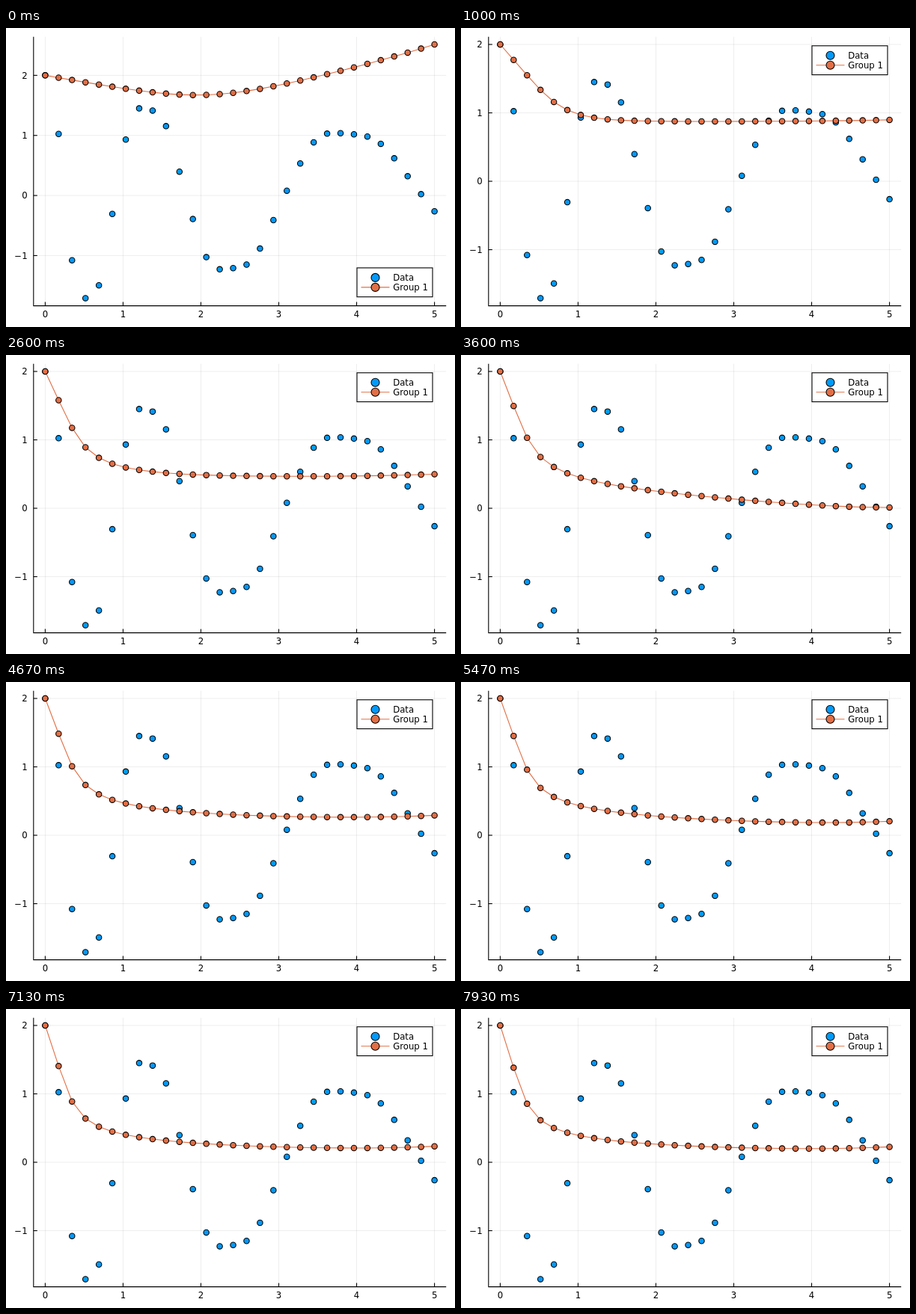
Recreate the animation shown at these times as an HTML page with a canvas. Size 600 px wide and 400 px high, loop 8 s.

```html
<!DOCTYPE html>
<html lang="en">
<head>
<meta charset="utf-8">
<title>Curve fit</title>
<style>
  html, body { margin: 0; width: 100%; height: 100%; overflow: hidden; background: #fff; }
  canvas { display: block; width: 600px; height: 400px; }
</style>
</head>
<body>
<canvas id="plot" width="600" height="400"></canvas>
<script>
const ctx = document.getElementById('plot').getContext('2d');
const LOOP = 8000, FPS = 15;
const COUNT = 30, SPAN = 5, SUBSTEPS = 8;
const BLUE = '#009afa', ORANGE = '#e26f46';
const AXIS = { left: 36.8, right: 588.2, top: 11.8, bottom: 371.6 };

// Runge-Kutta solution of u' = rate(u, t); returns the first component at COUNT times.
function solve(rate, start) {
  const h = SPAN / (COUNT - 1) / SUBSTEPS;
  const add = (u, k, f) => u.map((value, i) => value + k[i] * f);
  const values = [start[0]];
  let u = start;
  for (let n = 0; n < (COUNT - 1) * SUBSTEPS; n++) {
    const t = n * h;
    const k1 = rate(u, t);
    const k2 = rate(add(u, k1, h / 2), t + h / 2);
    const k3 = rate(add(u, k2, h / 2), t + h / 2);
    const k4 = rate(add(u, k3, h), t + h);
    u = u.map((value, i) => value + h / 6 * (k1[i] + 2 * k2[i] + 2 * k3[i] + k4[i]));
    if ((n + 1) % SUBSTEPS === 0) values.push(u[0]);
  }
  return values;
}

// The data: a cubic spiral that winds inwards.
const data = solve(([x, y]) => [
  -.1 * x ** 3 + 2 * y ** 3,
  -2 * x ** 3 - .1 * y ** 3
], [2, 0]);

// Lift of the fitted curve against its decay: [seconds, lift].
const lifts = [
  [0, 2.24], [1, 1.065], [2.6, .215], [3.6, -.1],
  [4.67, .025], [5.6, -.03], [6.4, .003], [8, 0]
];

function liftAt(s) {
  const i = lifts.findIndex(([time]) => time > s);
  const [t0, a] = lifts[i - 1], [t1, b] = lifts[i];
  return a + (b - a) * (s - t0) / (t1 - t0);
}

// The fit: a saturating cubic decay whose strength grows as training goes on.
function fitAt(s) {
  const pull = 2.2 + .175 * s;
  const gain = 1.4 + .32 * s;
  const swing = .27 * Math.max(0, 1 - s);
  const lift = liftAt(s);
  return solve(([u], t) => [
    lift - pull * Math.tanh(gain * u ** 3 / pull)
      + swing * Math.tanh((t - 2.1) / .8) + .1 * (t / SPAN) ** 5
  ], [2]);
}

function line(points, color, width) {
  ctx.beginPath();
  points.forEach(([x, y]) => ctx.lineTo(x, y));
  ctx.strokeStyle = color;
  ctx.lineWidth = width;
  ctx.stroke();
}

function dot(x, y, radius, color) {
  ctx.beginPath();
  ctx.arc(x, y, radius, 0, 2 * Math.PI);
  ctx.fillStyle = color;
  ctx.fill();
  ctx.strokeStyle = '#000';
  ctx.lineWidth = 1.1;
  ctx.stroke();
}

function label(text, x, y, align) {
  ctx.fillStyle = '#000';
  ctx.textAlign = align;
  ctx.fillText(text, x, y + 4.2);
}

function drawLegend(top) {
  ctx.fillStyle = '#fff';
  ctx.fillRect(469, top, 101, 38.8);
  ctx.strokeStyle = '#000';
  ctx.lineWidth = 1.1;
  ctx.strokeRect(469, top, 101, 38.8);
  const first = top + 13, second = top + 26;
  dot(493.5, first, 5.5, BLUE);
  line([[474.5, second], [512.5, second]], ORANGE, 1.1);
  dot(493.5, second, 5.5, ORANGE);
  label('Data', 517.2, first + .2, 'left');
  label('Group 1', 517.2, second + .2, 'left');
}

function draw(frame) {
  const fit = fitAt(frame / FPS);
  const high = Math.max(...fit, ...data), low = Math.min(...fit, ...data);
  const px = x => 52.4 + x * 104.04;
  const py = y => 22 + (high - y) / (high - low) * 339.4;
  const toPoint = (y, i) => [px(i * SPAN / (COUNT - 1)), py(y)];
  const { left, right, top, bottom } = AXIS;
  const xTicks = [0, 1, 2, 3, 4, 5], yTicks = [-1, 0, 1, 2];

  ctx.fillStyle = '#fff';
  ctx.fillRect(0, 0, 600, 400);
  ctx.font = '11.7px "DejaVu Sans", sans-serif';

  const grid = 'rgba(0, 0, 0, .1)';
  xTicks.forEach(x => line([[px(x), top], [px(x), bottom]], grid, .7));
  yTicks.forEach(y => line([[left, py(y)], [right, py(y)]], grid, .7));

  line([[left, top], [left, bottom], [right, bottom]], '#000', 1.1);
  xTicks.forEach(x => {
    line([[px(x), bottom], [px(x), bottom - 5]], '#000', 1.1);
    label(String(x), px(x), 383.2, 'center');
  });
  yTicks.forEach(y => {
    line([[left, py(y)], [left + 5, py(y)]], '#000', 1.1);
    label(String(y).replace('-', '\u2212'), 28.6, py(y), 'right');
  });

  data.map(toPoint).forEach(([x, y]) => dot(x, y, 3.7, BLUE));
  const points = fit.map(toPoint);
  line(points, ORANGE, 1.1);
  points.forEach(([x, y]) => dot(x, y, 3.7, ORANGE));

  // The legend sits in whichever right-hand corner is free.
  drawLegend(fit[COUNT - 1] > 1.4 ? 320.9 : 23.8);
}

let shown = -1;
function tick() {
  const frame = Math.floor((performance.now() % LOOP + 5) * FPS / 1000) % (LOOP * FPS / 1000);
  if (frame !== shown) draw(shown = frame);
  requestAnimationFrame(tick);
}
tick();
</script>
</body>
</html>
```
